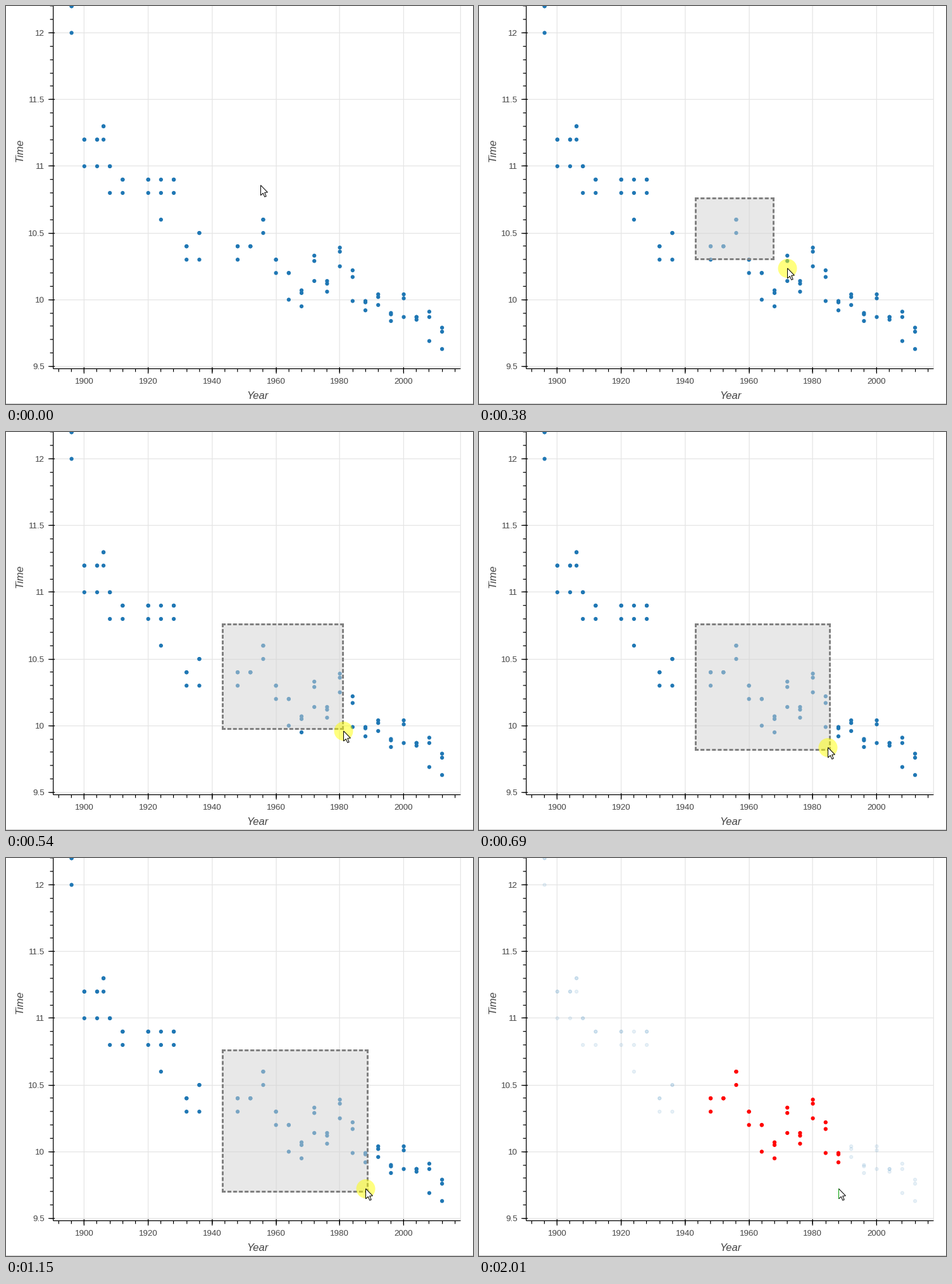
Recreate the animation shown at these times as a matplotlib script. Size 738 by 628 pixels, loop 2.08 s.

```python
import numpy as np
import matplotlib.pyplot as plt
from matplotlib.animation import FuncAnimation
from matplotlib.collections import LineCollection, PatchCollection
from matplotlib.patches import Circle, Polygon, Rectangle

W, H, DPI = 738, 628, 100
PX = 72 / DPI   # one pixel in points
ZOOM = 1.25     # the plot is laid out in units of 1.25 pixels
LOOP, TICK = 2080, 10

LEFT, RIGHT, BOTTOM = 74.625, 718.375, 572.375
X0, Y0 = 123.375, 42.375   # grid crossing at year 1900, time 12
INK, GRID, BLUE, GREEN = "#444444", "#e5e5e5", "#1f77b4", "#00a000"

# Best time of each race and the gap down to third place
YEARS = sorted({*range(1896, 2013, 4), 1906} - {1916, 1940, 1944})
BEST = [12, 11, 11, 11.2, 10.8, 10.8, 10.8, 10.6, 10.8, 10.3, 10.3, 10.3,
        10.4, 10.5, 10.2, 10, 9.95, 10.14, 10.06, 10.25, 9.99, 9.92, 9.96,
        9.84, 9.87, 9.85, 9.69, 9.63]
GAP = [.2, .2, .2, .1, .2, .1, .1, .3, .1, .1, .2, .1, 0, .1, .1, .2,
       .12, .19, .08, .14, .23, .07, .08, .06, .17, .02, .22, .16]

# The drag advances on a steady beat, cut to whole ticks
BEATS = np.floor(np.r_[1:14, 15] * 7.73) * TICK
SELECT, SETTLE = 1380, 2010
REST, BOX_START = np.array([402, 282]), np.array([341, 302])
KEY_T = np.array([70, 380, 540, 690, 1150])
TIP = np.array([(364, 314), (487, 413), (533, 471), (551, 497), (568, 521)])
CORNER = np.array([(354, 312), (467, 401), (534, 470), (556, 503),
                   (573, 528)])

ARROW = np.array([(0.5, 0.8), (0.5, 16.8), (4.2, 13.3), (6.8, 19.2),
                  (9.2, 18.2), (6.7, 12.3), (11.4, 12.0)])


def sx(year):
    return X0 + 0.42 + 5.0475 * (year - 1900)


def sy(time):
    return Y0 + 210.5 * (12 - time)


def snap(v, origin):
    return origin + ZOOM * np.round((v - origin) / ZOOM)


def glide(keys, t):
    """Smooth pass through the keys, rounded to whole pixels."""
    i = min(np.searchsorted(KEY_T, t, side="right") - 1, len(KEY_T) - 2)
    slope = np.gradient(keys.astype(float), KEY_T, axis=0)
    span = KEY_T[i + 1] - KEY_T[i]
    u = (t - KEY_T[i]) / span
    ease = u * u * (3 - 2 * u)
    bend = span * u * (1 - u) * ((1 - u) * slope[i] - u * slope[i + 1])
    return np.round(keys[i] * (1 - ease) + keys[i + 1] * ease + bend)


def dashes(x0, y0, x1, y1, size=6, gap=3):
    """Dashed border whose dashes begin and end flush at each corner."""
    def starts(a, b):
        n = max(1, round((b - a - size) / (size + gap)))
        return np.linspace(a, b - size, n + 1)

    rows = [[(x, y), (x + size, y)] for y in (y0 + 1.5, y1 - 1.5)
            for x in starts(x0, x1)]
    cols = [[(x, y), (x, y + size)] for x in (x0 + 1.5, x1 - 1.5)
            for y in starts(y0, y1)]
    return rows + cols


def race_points():
    for year, best, gap in zip(YEARS, BEST, GAP):
        digits = 1 if year < 1968 else 2  # hand-held watches before that
        for share in (0, 0.8, 1):
            yield year, round(best + share * gap, digits)


fig = plt.figure(figsize=(W / DPI, H / DPI), dpi=DPI, facecolor="white")
ax = fig.add_axes([0, 0, 1, 1])
ax.set_xlim(0, W)
ax.set_ylim(H, 0)
ax.axis("off")


def lines(segments, color, z, width=ZOOM):
    return ax.add_collection(LineCollection(
        segments, colors=color, linewidths=width * PX, zorder=z, snap=False))


def dots(points, color, alpha=1):
    circles = [Circle((sx(x), sy(y)), 2 * ZOOM) for x, y in points]
    return ax.add_collection(PatchCollection(
        circles, facecolors=color, edgecolors=color, linewidths=ZOOM * PX,
        alpha=alpha, zorder=3))


def label(x, y, text, size=10.67, **kw):
    ax.text(x, y, text, fontsize=size * ZOOM * PX, family="Liberation Sans",
            color=INK, **kw)


def draw_chart():
    years, times = np.arange(1900, 2001, 20), np.arange(9.5, 12.1, 0.5)
    gx, gy = snap(sx(years), X0), snap(sy(times), Y0)
    lines([[(x, 0), (x, BOTTOM)] for x in gx]
          + [[(LEFT, y), (RIGHT, y)] for y in gy]
          + [[(RIGHT, 0), (RIGHT, BOTTOM)]], GRID, 1)

    def ticks(xs, ys, inner, outer):
        return ([[(x, BOTTOM - inner), (x, BOTTOM + outer)] for x in xs]
                + [[(LEFT - outer, y), (LEFT + inner, y)] for y in ys])

    minor_x = snap(sx(np.arange(1892, 2017, 4)), X0)
    minor_y = snap(sy(np.arange(9.5, 12.25, 0.1)), Y0)
    lines([[(LEFT, 0), (LEFT, BOTTOM)], [(LEFT, BOTTOM), (RIGHT, BOTTOM)]]
          + ticks(minor_x, minor_y, 0, 4 * ZOOM)
          + ticks(gx, gy, 2 * ZOOM, 6 * ZOOM), "black", 4)
    lines([[(0, 627.5), (W, 627.5)]], "#c8c8c8", 1, 1)

    for x, year in zip(gx, years):
        label(x, 596.4, str(year), ha="center")
    for y, time in zip(gy, times):
        label(61, y + 4.6, f"{time:g}", ha="right")
    title = dict(size=13.33, style="italic", ha="center")
    label(397, 620, "Year", **title)
    label(26, 227.5, "Time", rotation=90, rotation_mode="anchor", **title)


draw_chart()
points = list(race_points())
inside = [p for p in points if 1944 < p[0] < 1990]
outside = [p for p in points if p not in inside]
plain = dots(points, BLUE)
faded = dots(outside, BLUE, 0.1)
chosen = dots(inside, "red")

shade = ax.add_patch(Rectangle(BOX_START, 1, 1, fc="#d3d3d3", ec="none",
                               alpha=0.5, zorder=5))
border = lines([], "#808080", 6, 3)
halo = ax.add_patch(Circle((0, 0), 15, fc="#ffff00", ec="none", alpha=0.5,
                           zorder=7))
arrow = ax.add_patch(Polygon(ARROW, fc="white", ec="black", lw=PX,
                             joinstyle="miter", zorder=8))
left_edge = lines([], GREEN, 9, 1)
slant = lines([], GREEN, 9, 1)


def update(frame):
    ms = frame * TICK
    dragging, done = BEATS[0] <= ms < SELECT, ms >= SELECT

    plain.set_visible(not done)
    for art in (faded, chosen, left_edge):
        art.set_visible(done)
    for art in (shade, border, halo):
        art.set_visible(dragging)
    slant.set_visible(SELECT <= ms < SETTLE)

    tip = REST
    if ms >= BEATS[0]:
        now = BEATS[BEATS <= ms][-1]
        tip, corner = glide(TIP, now), glide(CORNER, now)
        shade.set_width(corner[0] - BOX_START[0])
        shade.set_height(corner[1] - BOX_START[1])
        border.set_segments(dashes(*BOX_START, *corner))
        halo.center = tip + (0.5, 1)

    outline = ARROW + tip
    arrow.set_xy(outline)
    left_edge.set_segments([outline[:2]])
    slant.set_segments([outline[[0, -1]]])
    return ()


anim = FuncAnimation(fig, update, frames=LOOP // TICK, interval=TICK,
                     repeat=True, repeat_delay=0, init_func=lambda: ())
plt.show()
```
